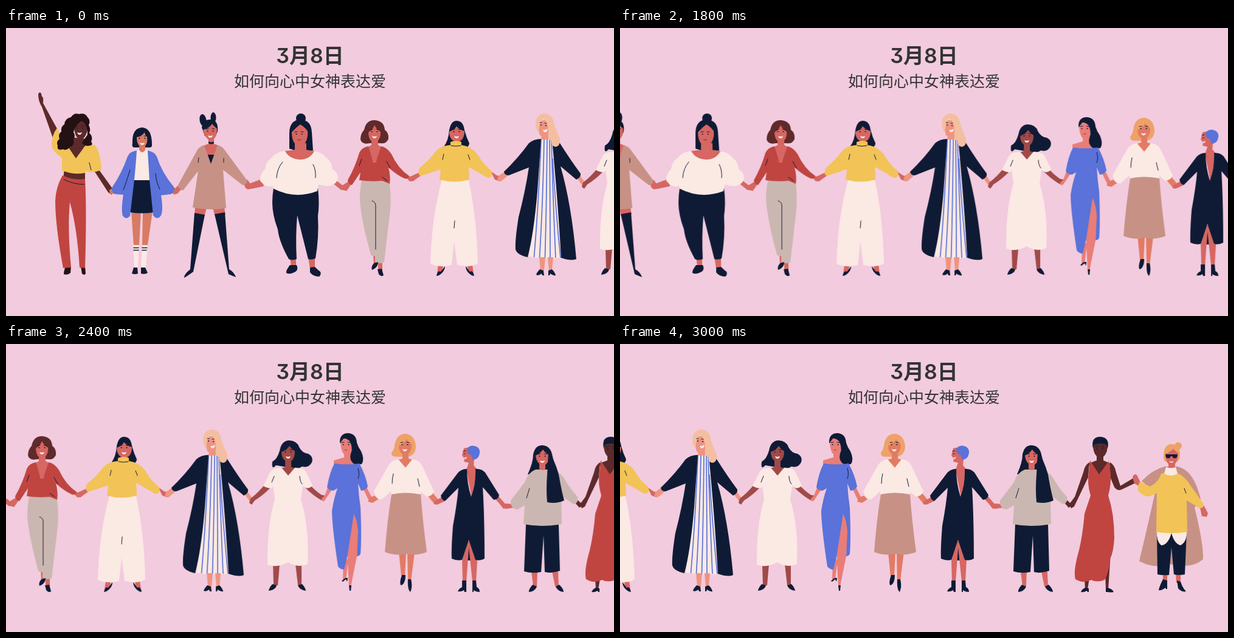
An HTML page for the animation above (4 s loop, 1000 by 475 pixels).

```html
<!DOCTYPE html>
<html lang="zh-CN">
<head>
<meta charset="utf-8">
<title>3月8日</title>
<style>
html,body{margin:0;width:100%;height:100%;overflow:hidden;background:#f2cbde}
svg{display:block;width:100vw;height:100vh}
text{font-family:"Noto Sans CJK SC","Noto Sans CJK",sans-serif;text-anchor:middle;fill:#333}
.h1{font-size:34px;font-weight:700}
.h1 tspan{font-family:Inter,sans-serif;font-weight:600;font-feature-settings:"cv09"}
.h2{font-size:25px}
/* clothes and hair */
.n{fill:#0f1b35}.w{fill:#fbe9e4}.b{fill:#5a72d9}.r{fill:#c04541}.y{fill:#f2c357}
.t{fill:#c79285}.g{fill:#cbb7b1}.k{fill:#231113}.br{fill:#5f2a2b}.bl{fill:#f4bfa0}.o{fill:#eea267}
.l{fill:none;stroke:#0f1b35;stroke-linecap:round}
.stripe{fill:none;stroke:#5a72d9;stroke-width:1.7}
/* skin tones */
.s1{fill:#5c2a2a}.s2{fill:#d87b64}.s3{fill:#d66762}.s4{fill:#ee9480}
.s5{fill:#a04a48}.s6{fill:#e97d78}.s7{fill:#e27b64}
#row{animation:slide 4s infinite}
@keyframes slide{
  0%,25%{transform:translateX(0);animation-timing-function:steps(11,start)}
  80%,100%{transform:translateX(-752px)}
}
</style>
</head>
<body>
<svg viewBox="0 0 1000 475">
<defs>
  <g id="eyes"><circle class="n" cx="-4.5" r="1"/><circle class="n" cx="4.5" r="1"/><path class="l" d="M-7-3.5L-3-4M3-4L7-3.5"/></g>
  <g id="face"><use href="#eyes"/><path class="w" d="M-4 7Q0 9 4 7Q3 11 0 11Q-3 11-4 7Z"/></g>
</defs>
<text class="h1" x="500" y="58"><tspan>3</tspan>月<tspan>8</tspan>日</text>
<text class="h2" x="500" y="97">如何向心中女神表达爱</text>
<g id="row">

<g class="s1">
  <path d="M53 109Q55 104 58 108L59 113Q62 113 61 124L84 166 78 184 59 130Q53 121 53 109Z"/>
  <path d="M104 180L134 183 132 205 115 217 99 205ZM96 230H130V252H94ZM144 234L153 234 176 266 174 275 168 271Z"/>
  <path class="k" d="M98 393H107L106 404Q101 408 95 406Q95 401 98 393ZM123 393H130L131 405Q129 409 125 405Z"/>
  <path class="r" d="M93 243Q112 252 130 249Q133 300 130 396L121 395Q117 330 105 287Q101 330 107 395L94 396Q81 325 81 285Q82 262 93 243Z"/>
  <path class="y" d="M84 165Q75 176 75 195Q78 205 92 214V235Q112 243 130 239V236Q143 240 157 234Q155 205 147 194L134 189 115 215 98 190Z"/>
  <path class="l" d="M95 250Q112 258 129 258M137 222L140 234"/>
  <path d="M111 155Q123 146 134 157Q136 176 124 185Q112 184 111 155Z"/>
  <path class="k" d="M107 147Q112 139 120 142Q130 139 134 147Q140 153 136 160Q140 168 137 173Q144 180 140 187Q144 193 138 194Q128 196 125 189Q130 182 134 176Q134 158 124 153Q112 162 111 172Q115 178 111 184Q113 194 105 196Q100 203 94 200Q83 203 85 194Q82 187 88 183Q85 175 91 171Q90 162 96 159Q97 149 107 147Z"/>
  <use href="#face" x="121" y="165"/>
</g>

<g class="s2">
  <path class="n" d="M208 190Q207 165 224 164Q240 165 240 192Q241 198 234 197H213Q206 198 208 190Z"/>
  <path class="w" d="M212 203L219 201H229L236 203 235 251H211Z"/>
  <path d="M219 190H229V201Q224 209 219 201ZM215 180Q223 179 228 172Q229 178 232 179Q234 195 224 196Q215 195 215 180Z"/>
  <use href="#face" x="224" y="182"/>
  <path d="M206 303H222L219 358H210ZM225 303H241L233 358H224Z"/>
  <path class="w" d="M209 358H219L217 396H211ZM224 358H233L230 396H222Z"/>
  <path class="l" stroke-width="1.5" d="M210 362.500H218M210 366.500H218M224 362.500H232M224 366.500H231"/>
  <path class="n" d="M210 251H237L243 304Q224 307 204 304ZM210 395H216L217 405Q212 407 207 405ZM222 395H229L233 404Q228 407 222 405Z"/>
  <path d="M176 264L170 267 171 274 178 273ZM275 263L285 265 284 272 277 275 272 272Z"/>
  <path class="b" d="M215 202Q203 204 200 212Q190 240 175 262Q172 272 180 274L193 275Q189 300 192 310Q198 317 204 310L211 250Q214 220 215 202ZM233 202Q244 204 248 212Q256 238 276 262Q280 270 271 274L255 276Q259 300 255 309Q249 318 242 309L236 250Q234 220 233 202Z"/>
  <path class="l" d="M204 234Q199 252 193 267M246 240Q247 255 253 266"/>
</g>

<g class="s3">
  <ellipse class="n" cx="324" cy="152" rx="5.500" ry="10" transform="rotate(-10 324 152)"/>
  <ellipse class="n" cx="341" cy="148" rx="4.500" ry="9"/>
  <path class="n" d="M322 164Q325 150 337 151Q350 153 348 170L345 178 327 178Z"/>
  <path d="M324 168Q335 165 339 158Q343 163 347 166Q347 183 337 186Q327 183 324 168ZM333 182H342V191L350 194 337 226 325 194 333 191Z"/>
  <use href="#face" x="336" y="170"/>
  <path class="n" d="M333 187Q338 190 342 187V190Q338 193 333 190ZM329 209H346L337 225Z"/>
  <path d="M282 260L289 266 280 274 274 271ZM390 255L397 250 404 260 400 266 394 264ZM311 296H330L327 309H310ZM340 296H359L361 308H343Z"/>
  <path class="t" d="M326 193Q316 196 312 206L283 259Q284 266 291 268L316 236 307 296Q335 302 362 297L357 234 389 259Q396 259 397 252L361 203Q356 195 348 193L337 224Z"/>
  <path class="l" d="M317 214L316 222M358 215V222"/>
  <path class="n" d="M310 305L327 308 308 402Q300 408 293 412Q292 407 303 398ZM343 307L360 304 367 398Q375 402 378 411L366 406Z"/>
</g>

<g class="s3">
  <circle class="n" cx="485" cy="149" r="8"/>
  <path class="n" d="M466 172Q467 151 485 151Q502 152 503 172L505 202Q487 206 466 199Z"/>
  <path d="M475 190H494V201L508 203Q500 219 483 219Q466 218 458 203L475 201ZM470 172Q478 163 484 159Q491 163 496 170Q498 188 484 197Q470 192 470 172Z"/>
  <use href="#eyes" x="482" y="175"/>
  <path class="r" d="M478 184Q482 182 486 184Q482 188 478 184Z"/>
  <path d="M421 249L402 256 393 262 397 266 405 265 424 261ZM540 249L553 259 562 262 560 268 551 267 540 258ZM467 378H477V393H469ZM497 378H508V397H500Z"/>
  <path class="n" d="M440 264H513Q516 290 513 310Q515 345 509 380Q503 383 497 381Q488 345 479 309Q476 345 478 381Q470 384 465 381Q449 352 447 332Q438 308 438 288Q438 276 440 264Z"/>
  <path class="w" d="M459 203Q444 204 437 214Q427 220 426 233Q417 240 418 252Q425 261 434 262L438 260 440 265Q475 283 512 269L514 258Q526 262 534 260Q546 256 546 246Q545 237 537 233Q536 220 527 214Q520 205 507 203Q500 217 483 217Q466 216 459 203Z"/>
  <path class="l" d="M455 221Q446 231 445 247M505 225Q510 234 509 247"/>
  <path class="n" d="M467 391L478 391Q482 400 474 403Q466 407 461 404Q460 400 467 391ZM500 395L508 394Q513 399 517 402Q519 407 515 410Q505 410 500 403Z"/>
</g>

<g class="s3">
  <path class="br" d="M589 168Q592 152 606 152Q622 153 623 168Q630 173 629 183Q625 192 615 190L598 190Q586 193 583 184Q583 174 589 168Z"/>
  <path d="M601 184H612V193L619 197 606 226 594 197 601 193ZM596 172Q604 167 606 160Q609 167 616 171Q617 185 606 189Q596 186 596 172Z"/>
  <use href="#face" x="606" y="171"/>
  <path d="M562 254L554 259 552 266 560 269 567 259ZM655 243L672 246 671 252 664 253ZM604 374H610V389H605ZM612 385H619V400H612Z"/>
  <path class="g" d="M585 251H630Q634 275 632 300L622 386Q615 390 607 386V376Q602 377 600 374Q585 320 582 285Q582 265 585 251Z"/>
  <path class="r" d="M596 195Q585 197 581 206Q574 230 562 251Q562 258 569 259L583 238 581 251Q600 254 619 252L631 257Q633 245 629 230Q642 242 655 248Q662 250 663 244Q645 232 634 208Q627 197 617 195L608 222H604Z"/>
  <path class="l" d="M585 216L581 227M626 220L632 231M619 246L627 252M602 285Q608 287 608 293V365"/>
  <path class="n" d="M605 388L612 386Q612 395 602 399Q600 394 605 388ZM611 398L618 397 621 408Q617 411 613 406Z"/>
</g>

<g class="s3">
  <path class="n" d="M720 196Q728 185 729 168Q732 153 741 153Q752 153 754 168Q757 180 762 190Q762 197 752 199H725Z"/>
  <path d="M729 171Q738 168 741 162Q746 168 754 170Q754 186 742 188Q729 186 729 171Z"/>
  <use href="#face" x="741" y="171"/>
  <path d="M680 238L665 245 662 251 669 253 683 243ZM797 236L807 243 815 245 812 253 804 250ZM711 390H720L716 404 709 405ZM758 390H767L769 405 762 404Z"/>
  <path class="w" d="M717 251H761Q774 310 776 388Q766 396 742 391L737 352 733 391Q714 396 698 389Q700 310 717 251Z"/>
  <path class="y" d="M731 188Q741 184 749 188V193Q768 196 778 212Q785 225 799 236Q801 248 792 247L761 229 762 250Q737 257 713 250L715 233 682 244Q676 242 680 231Q696 218 708 202Q716 194 731 193Z"/>
  <path class="l" d="M720 208L718 217M760 209L763 217M732 194Q740 196 748 194M738 318L737 330"/>
  <path class="n" d="M708 409Q710 399 715 402Q720 395 722 393Q722 402 712 408ZM770 409Q768 399 763 402Q758 395 756 393Q756 402 766 408Z"/>
</g>

<g class="s4">
  <path class="w" d="M878 183H900L915 379Q888 382 860 377Z"/>
  <path class="stripe" d="M880 184Q876 290 868.500 378M885 184Q883 290 877.500 379M890 184Q889 290 886.500 380M894 184Q895 290 895 380M897 184Q900 290 904 379M899 215Q904 300 912 379"/>
  <path d="M881 175H892V184H880ZM875 160Q880 148 892 154V178Q884 182 878 177Q876 170 875 160Z"/>
  <path d="M820 237L810 244 808 251 814 253 826 243ZM938 246L944 243 953 256 950 262 946 257ZM877 378H887L885 400H879ZM891 378H900L898 400H893Z"/>
  <path class="n" d="M880 183Q868 183 860 190Q842 215 819 237Q820 243 827 243L860 230Q854 270 843 312Q837 350 838 365Q840 374 858 378Q868 340 874 270ZM898 183Q906 183 911 190Q930 220 945 240Q946 246 938 250L912 228Q930 290 938 381Q930 385 913 379Q908 290 898 183Z"/>
  <path class="bl" d="M871 158Q872 141 887 141Q900 143 902 160Q906 172 911 182Q912 195 904 196Q896 195 897 186Q890 184 892 172Q893 158 884 149Q877 155 876 172Q871 166 871 158Z"/>
  <path class="l" d="M878 156H881M886 157H889"/>
  <circle class="n" cx="880" cy="160" r="1"/><circle class="n" cx="888" cy="161" r="1"/>
  <path class="w" d="M883 168Q887 169 891 166Q890 172 887 172Q884 172 883 168Z"/>
  <path class="n" d="M878 398L884 400 885 408H882L881 405Q876 409 872 407Q873 403 878 398ZM898 398L892 400V408H894L895 405Q900 409 904 408Q903 403 898 398Z"/>
</g>

<g transform="translate(752)">
<g class="s5">
  <path class="n" d="M239 200Q231 209 233 194Q241 190 245 176Q248 159 261 159Q274 160 277 170Q282 180 292 181Q301 186 298 195Q293 205 282 202Q268 211 256 203Z"/>
  <path d="M254 190H264V203L271 205 259 219 247 205 254 203ZM248 178Q257 175 261 168Q265 174 270 177Q270 192 260 195Q248 192 248 178Z"/>
  <use href="#face" x="259" y="178"/>
  <path d="M222 230L230 237Q216 251 204 258L199 265 195 262 197 255Q210 245 222 230ZM287 237L294 231Q302 241 314 249L320 250 320 257 314 258Q300 250 287 237ZM234 363H245L242 398H235ZM271 363H281V398H275Z"/>
  <path class="w" d="M248 204Q234 204 230 210L218 234Q224 238 232 238L234 234 237 256Q224 300 225 364Q241 370 259 360Q275 370 291 363Q294 300 280 257L283 234 290 238Q297 237 299 233L288 210Q284 204 270 204L259 217Z"/>
  <path class="l" d="M236 218L232 228M278 218Q278 226 282 231"/>
  <path class="n" d="M233 396L240 398Q238 406 227 407Q227 403 233 396ZM282 396L275 398Q278 406 288 407Q288 403 282 396Z"/>
</g>

<g class="s6">
  <path d="M351 176H363V187L376 193V203H334V192L351 187ZM345 158Q352 150 366 162Q364 178 356 184Q345 183 345 158Z"/>
  <path class="n" d="M344 164Q343 147 358 147Q371 148 372 163Q374 170 379 177Q385 190 380 198Q372 200 366 197Q359 190 362 181Q366 170 360 160Q354 155 350 156Q347 160 344 164Z"/>
  <use href="#eyes" x="354" y="166"/>
  <path class="r" d="M351 174H357Q354 177 351 174Z"/>
  <path d="M324 237L331 240 321 255 317 260 313 256 319 250ZM382 238L388 236 395 250 400 255 396 261 391 257ZM366 275L376 300 372 350 362 400H359L356 340ZM350 355H358L354 388H349Z"/>
  <path class="b" d="M335 197Q355 200 376 197Q386 215 390 235Q386 242 379 242L374 230Q375 250 378 270Q380 320 378 346Q376 350 372 350L374 310Q373 292 367 280L357 345V347L351 372Q345 372 341 367Q331 300 331 275Q334 255 340 238L333 242Q325 241 323 236Q327 212 335 197Z"/>
  <path class="l" d="M374 205Q377 215 374 222"/>
  <path class="n" d="M347 391Q352 385 357 386L356 392 354 388 349 392ZM359 398H363L362 407H360Z"/>
</g>

<g class="s7">
  <path class="o" d="M434 168Q436 149 452 148Q468 150 469 170Q468 184 455 186H440Q428 187 429 179Q433 175 434 168Z"/>
  <path d="M447 180H457V189L464 191 452 206 440 191 447 189ZM441 168Q450 164 454 157Q458 163 462 165Q462 181 451 184Q441 180 441 168Z"/>
  <use href="#face" x="451" y="166"/>
  <path d="M401 250L393 254 390 260 398 262 407 256ZM489 251L497 246 507 258 503 265 497 261ZM441 343H453L451 383H445ZM455 343H467L461 391H456Z"/>
  <path class="w" d="M440 190Q428 192 423 202L400 243Q402 254 412 257L428 243V248Q452 253 477 248V244L487 252Q497 250 499 243L480 202Q475 191 463 190L452 204Z"/>
  <path class="t" d="M429 248Q452 243 477 248Q480 290 487 343Q470 350 452 346Q435 350 418 343Q422 290 429 248Z"/>
  <path class="l" d="M432 214Q430 222 430 230M472 222L475 235"/>
  <path class="n" d="M446 381H452Q452 395 445 398Q441 396 446 381ZM456 388H461Q464 400 460 409Q455 405 456 388Z"/>
</g>

<g class="s3">
  <path d="M548 172L558 170 566 180 564 200 570 207 561 254 552 207 556 196 548 194 549 189 545 184Z"/>
  <path class="b" d="M553 173Q557 167 565 168Q575 170 574 180Q572 191 563 191L560 183Q553 182 553 173Z"/>
  <path class="l" d="M547 177L551 176M548 181H550"/>
  <path class="w" d="M548 188L553 186 551 190Z"/>
  <path class="n" d="M548 325H566V357H548Z"/>
  <path d="M511 253L500 259 498 264 504 265 517 259ZM599 255L605 251 618 266 613 272 607 264ZM552 325H557L552 392H546L545 357ZM555 325H560L570 357 568 392H562Z"/>
  <path class="n" d="M553 206Q543 206 537 214L510 250Q511 257 517 259L539 237Q537 262 530 300Q527 340 528 354Q537 358 545 356L556 323 567 356Q575 358 582 354Q582 300 580 254L579 236 597 257Q605 256 606 249L583 212Q577 205 567 206Q568 230 560 252Q553 230 553 206ZM545 390H552V409H549L548 406Q543 409 538 408Q540 403 545 401ZM562 390H568L569 401Q574 403 574 409Q568 409 564 406V409H562Z"/>
</g>

<g class="s3">
  <path class="n" d="M653 215Q662 195 662 182Q665 167 677 167Q690 168 693 182L700 210 690 215Z"/>
  <path d="M627 264L617 263 611 268 616 272 630 270ZM659 375H669L668 400H662ZM693 375H703L704 400H698Z"/>
  <path class="s1" d="M730 261L736 258 744 266 738 270Z"/>
  <path class="n" d="M650 297H704L706 374Q692 379 681 376L679 316 675 376Q660 379 647 375Z"/>
  <path class="g" d="M666 207Q653 212 648 228L625 258Q624 272 636 273L648 266 646 297Q675 303 709 297L708 250 728 264Q737 263 735 252Q722 238 713 222Q706 210 690 207Z"/>
  <path d="M672 196H682V206Q677 210 672 206ZM666 184Q674 180 678 174Q682 180 688 183Q689 197 678 201Q667 197 666 184Z"/>
  <use href="#face" x="677" y="185"/>
  <path class="n" d="M687 178Q697 190 704 215Q708 240 713 258Q700 264 685 261Q683 240 685 215Z"/>
  <path class="l" d="M656 238L651 254"/>
  <path class="n" d="M661 397L668 400Q665 408 655 409Q654 405 661 397ZM705 397L699 400Q702 408 712 409Q712 404 705 397Z"/>
</g>

<g class="s1">
  <path d="M778 166Q790 158 802 166Q802 185 790 188Q778 185 778 166ZM784 183H795V192L806 197 802 215H774L771 197 784 192Z"/>
  <path class="n" d="M778 172Q774 153 790 153Q806 154 802 172L800 166Q790 162 780 166Z"/>
  <use href="#eyes" x="789" y="173"/>
  <path class="br" d="M785 180Q789 182 793 180Q789 186 785 180Z"/>
  <path d="M772 195Q764 200 762 212L748 252 739 264 742 271 747 268 770 220ZM806 195Q814 200 816 212L823 234 843 222 848 215 851 222 846 230 825 240Q818 243 813 236L804 214ZM764 386H772L769 405H765ZM797 345H807L803 405H799Z"/>
  <path class="r" d="M773 192L788 215 804 193 807 214Q808 232 803 250Q813 280 813 320Q812 342 806 355Q805 375 797 389Q785 394 775 389Q763 396 749 388Q745 375 755 340Q761 315 764 280Q770 262 774 250Q768 230 771 212Z"/>
  <path class="n" d="M765 402L771 403V409H769L768 407Q762 410 758 409Q760 404 765 402ZM802 402L799 404V409H802Q808 410 812 409Q810 404 802 402Z"/>
</g>

<g class="s3">
  <path class="t" d="M896 202Q876 207 858 226L880 245Q868 300 854 358Q880 372 905 363Q940 372 959 355Q960 330 945 270L955 255Q949 232 941 220Q932 206 917 202Z"/>
  <circle class="o" cx="918" cy="168" r="6"/>
  <path class="o" d="M894 185Q894 165 908 165Q922 167 921 183Q921 193 914 195H900Q893 193 894 185Z"/>
  <path d="M902 194H913V206H902ZM897 181Q905 178 910 173Q914 177 918 180Q918 197 907 202Q897 197 897 181Z"/>
  <path class="n" d="M897 182H917L916 187Q911 191 908 185H906Q903 191 898 187Z"/>
  <path class="w" d="M903 193Q907 195 911 193Q907 199 903 193Z"/>
  <path d="M954 270L960 266 967 279 965 285 957 284ZM856 228L850 216Q844 213 843 221L846 230 853 234ZM893 378H900V392H893ZM914 378H922V394H915Z"/>
  <path class="n" d="M883 311H932L929 380Q920 382 911 380L907 335 903 381Q893 382 884 380Z"/>
  <path class="w" d="M883 308H932Q933 326 922 332Q912 330 907 312Q901 332 890 332Q882 325 883 308Z"/>
  <path class="y" d="M897 212L890 214Q886 228 872 235L855 227Q851 234 852 242Q862 253 872 251L883 246 882 310Q907 314 933 310L932 258 954 271Q961 270 960 264L940 236Q930 218 915 212Z"/>
  <path class="w" d="M898 203Q906 206 914 203L917 214Q906 220 895 214Z"/>
  <path class="l" d="M928 238L931 246"/>
  <path class="n" d="M893 388L900 390V404H898L897 402Q891 407 886 406Q887 400 893 388ZM916 390L922 392Q925 402 931 408Q924 410 918 403Z"/>
</g>
</g>

</g>
</svg>
</body>
</html>
```
